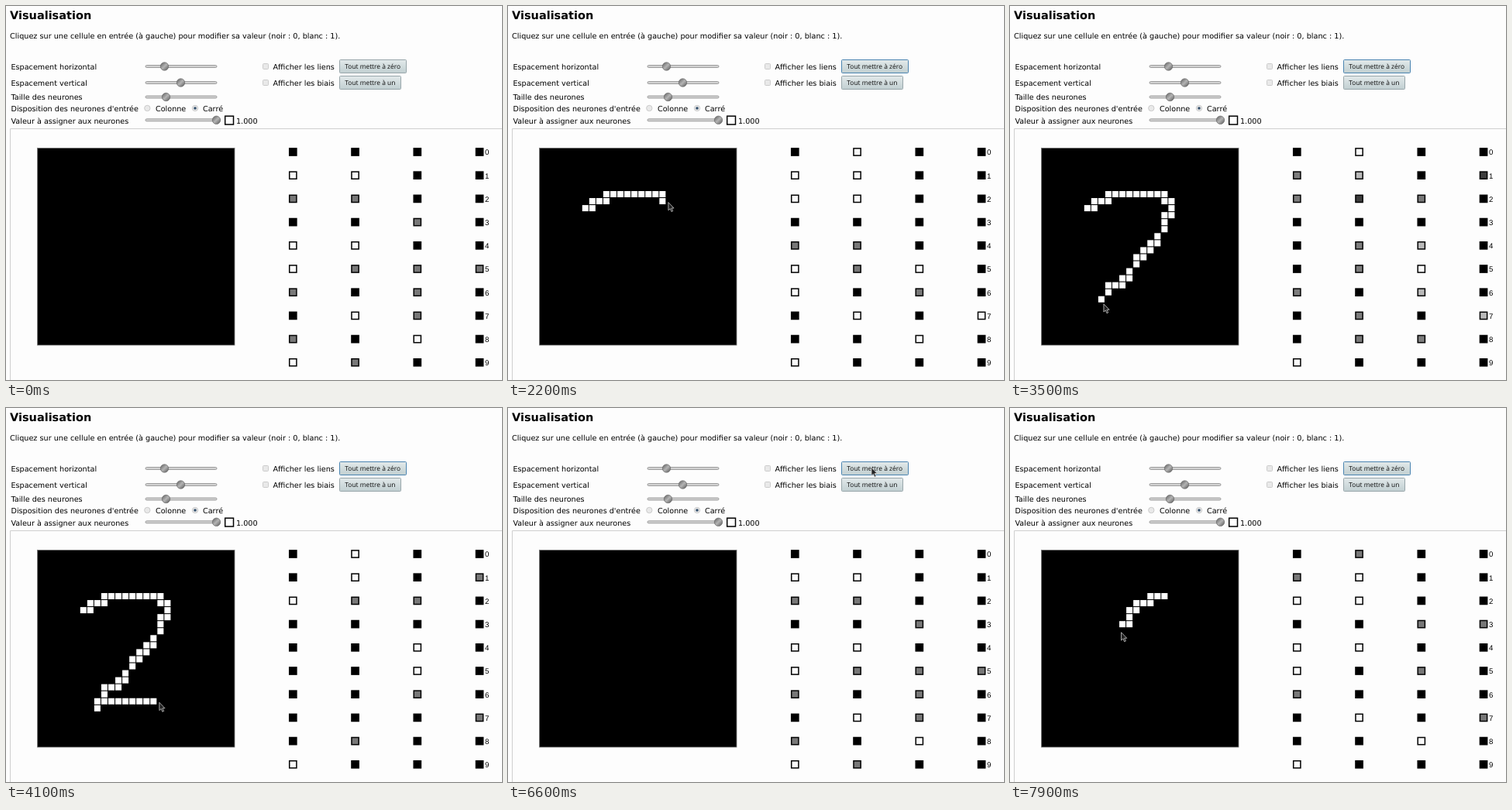
These frames come from a looping animation (640 by 483 pixels, 8000 ms). An HTML page:

```html
<!DOCTYPE html>
<html lang="fr">
<head>
<meta charset="utf-8">
<title>Visualisation</title>
<style>
  html, body { margin: 0; width: 100%; height: 100%; overflow: hidden; background: #fdfdfd; }
  svg { display: block; width: 640px; height: 483px; }
  text { font: 9.65px "DejaVu Sans", sans-serif; fill: #000; text-rendering: geometricPrecision; }
  .title { font-size: 14.5px; font-weight: bold; }
  .intro { font-size: 9.69px; }
  .btn text { font: 8.4px "Open Sans", sans-serif; fill: #0c0c0c; }
  .btn rect { fill: url(#face); stroke: #98a6aa; }
  .btn.focus rect { stroke: #4a84b0; }
  .digit { font: 9.65px "Liberation Sans", Arial, sans-serif; }
  .neuron { stroke: #000; stroke-width: 1.5; }
  .cell { fill: #fff; }
  .track { fill: #d2d2d2; stroke: #8c8c8c; stroke-width: .8; }
  .thumb { fill: url(#knob); stroke: #666; stroke-width: .7; }
  .check { fill: #e9e9e9; stroke: #c2c2c2; stroke-width: .8; }
</style>
</head>
<body>
<svg viewBox="0 0 640 483">
  <defs>
    <linearGradient id="face" x2="0" y2="1">
      <stop offset="0" stop-color="#e2e9ea"/><stop offset="1" stop-color="#c1cfd1"/>
    </linearGradient>
    <linearGradient id="knob" x2="1" y2="1">
      <stop offset="0" stop-color="#5c5c5c"/><stop offset=".5" stop-color="#b4b4b4"/><stop offset="1" stop-color="#555"/>
    </linearGradient>
  </defs>

  <text class="title" x="5" y="17">Visualisation</text>
  <text class="intro" x="5" y="41.5">Cliquez sur une cellule en entrée (à gauche) pour modifier sa valeur (noir : 0, blanc : 1).</text>
  <text x="6.5" y="81.5">Espacement horizontal</text>
  <text x="6.5" y="102.5">Espacement vertical</text>
  <text x="6.5" y="121">Taille des neurones</text>
  <text x="6.5" y="135.5">Disposition des neurones d'entrée</text>
  <text x="6.5" y="152">Valeur à assigner aux neurones</text>
  <text x="193" y="135.5">Colonne</text>
  <text x="254" y="135.5">Carré</text>
  <text x="297" y="152">1.000</text>
  <text x="344.5" y="81.5">Afficher les liens</text>
  <text x="344.5" y="102.5">Afficher les biais</text>

  <g id="sliders"></g>
  <circle class="check" cx="182.3" cy="132" r="3.7"/>
  <circle class="check" cx="244" cy="132" r="3.7"/>
  <circle cx="244" cy="132" r="1.8" fill="#34506c"/>
  <rect class="check" x="331.5" y="74.5" width="7" height="7" rx="1"/>
  <rect class="check" x="331.5" y="95.5" width="7" height="7" rx="1"/>
  <rect x="282.7" y="142.2" width="10.8" height="10.8" fill="#fff" stroke="#000" stroke-width="1.5"/>

  <g class="btn" id="reset">
    <rect x="430.5" y="69.5" width="86" height="17" rx="1"/>
    <text x="437.3" y="81">Tout mettre à zéro</text>
  </g>
  <g class="btn">
    <rect x="430.5" y="90.5" width="79" height="17" rx="1"/>
    <text x="437.3" y="102.3">Tout mettre à un</text>
  </g>

  <path d="M640 158.5H5.5V483" fill="none" stroke="#d0d0d0"/>
  <rect x="40.5" y="183.5" width="254.5" height="254.5" stroke="#777" stroke-width=".8"/>
  <g id="cells"></g>
  <g id="net"></g>
  <path id="cursor" d="M0 0V10.3L2.4 8.2 4 12 5.8 11.2 4.1 7.5H7.2Z" fill="#222" stroke="#ccc" stroke-width=".8"/>
</svg>
<script>
const LOOP = 8000, STEP = 100, FOCUS = 1100, RESET = 6500, PITCH = 9.05;
const $ = id => document.getElementById(id);
const linear = p => p;
const smooth = p => p * p * (3 - 2 * p);

function add(parent, tag, attrs) {
  const el = document.createElementNS('http://www.w3.org/2000/svg', tag);
  for (const k in attrs) el.setAttribute(k, attrs[k]);
  return parent.appendChild(el);
}

// Interpolates keys of the form [time, ...values].
function at(keys, t, ease = linear) {
  const i = keys.findIndex(k => k[0] > t);
  if (i <= 0) return keys.at(i).slice(1);
  const a = keys[i - 1], b = keys[i], p = ease((t - a[0]) / (b[0] - a[0]));
  return a.slice(1).map((v, j) => v + (b[j + 1] - v) * p);
}

for (const [x, y] of [[204.5, 78], [225.5, 99], [206.5, 117.5], [271.5, 147.3]]) {
  add($('sliders'), 'rect', { class: 'track', x: 180, y: y - 1.5, width: 92, height: 3, rx: 1.5 });
  add($('sliders'), 'circle', { class: 'thumb', cx: x, cy: y, r: 5.2 });
}

// Joins grid points by a staircase; a single diagonal step cuts the corner.
function trace(points) {
  const path = [points[0]];
  points.slice(1).forEach(([x1, y1], i) => {
    const [x0, y0] = points[i], dx = Math.abs(x1 - x0), dy = Math.abs(y1 - y0);
    if (dx === 1 && dy === 1) return path.push([x1, y1]);
    for (let a = 0, b = 0; a < dx || b < dy;) {
      if (a === dx || (b < dy && b * dx <= a * dy)) b++; else a++;
      path.push([x0 + a * Math.sign(x1 - x0), y0 + b * Math.sign(y1 - y0)]);
    }
  });
  return path;
}

function makeStroke(points, count) {
  const path = trace(points);
  const cells = path.map(([col, row]) => add($('cells'), 'rect', {
    class: 'cell', x: 41.5 + PITCH * col, y: 184.7 + PITCH * row, width: 8, height: 8
  }));
  // Pointer position ahead of the n-th painted cell.
  const tip = n => {
    const [col, row] = at(path.map((p, i) => [i, ...p]), n);
    return [44 + PITCH * col, 190.2 + PITCH * row];
  };
  return { cells, count, tip, begin: count[0][0], end: count.at(-1)[0] };
}

const two = makeStroke(
  [[6, 8], [7, 8], [9, 7], [17, 6], [18, 9], [17, 9], [17, 11], [16, 12], [13, 16], [12, 17],
   [11, 19], [9, 19], [9, 20], [8, 21], [8, 22], [9, 21], [19, 21]],
  [[1650, 0], [2200, 15], [2900, 29], [4100, 46], [4500, 49]]);
const arc = makeStroke(
  [[17, 6], [15, 6], [13, 7], [11, 11]],
  [[7350, 0], [7900, 11]]);
const strokes = [two, arc];

const moves = [
  [200, 268, 272], [800, 470, 77], [1000, 470, 77], [two.begin, ...two.tip(0)],
  [two.end, ...two.tip(49)], [5600, 469, 70], [6100, 469, 77], [6600, 469, 77],
  [arc.begin, ...arc.tip(0)]
];

// Each pose names the white and the grey rows of the four layers.
function pose(white, grey) {
  const w = white.split('|'), g = grey.split('|');
  return Array.from({ length: 40 }, (_, i) => {
    const layer = Math.floor(i / 10), row = i % 10;
    return w[layer].includes(row) ? 250 : g[layer].includes(row) ? 120 : 0;
  });
}
const idle = pose('1459|147|8|', '268|259|3567|5');
const done = pose('249|12|5|2', '|4|349|');
const activity = [
  [two.begin, ...idle],
  [2200, ...pose('12569|0127|58|7', '4|45|6|')],
  [2900, ...pose('169|0457|568|7', '|18|24|')],
  [4100, ...pose('29|01|45|', '|28|26|17')],
  [two.end, ...done], [RESET - 1, ...done],
  [RESET, ...idle], [arc.begin, ...idle],
  [arc.end, ...pose('2459|1247|8|', '16|0|35|37')]
];

const neurons = idle.map((_, i) => add($('net'), 'rect', {
  class: 'neuron', x: 365.7 + 80.25 * Math.floor(i / 10), y: 183.9 + 30.2 * (i % 10), width: 9.2, height: 9.2
}));
for (let i = 0; i < 10; i++)
  add($('net'), 'text', { class: 'digit', x: 618, y: 192.3 + 30.2 * i }).textContent = i;

function draw(t) {
  let tip = at(moves, t, smooth);
  for (const s of strokes) {
    const n = at(s.count, t)[0], erased = s === two && t >= RESET;
    s.cells.forEach((c, i) =>
      c.setAttribute('visibility', !erased && i + 1 <= n + 1e-6 ? 'visible' : 'hidden'));
    if (t >= s.begin && t <= s.end) tip = s.tip(n);
  }
  at(activity, t).forEach((v, i) => neurons[i].setAttribute('fill', `rgb(${v},${v},${v})`));
  $('cursor').setAttribute('transform', `translate(${tip})`);
  $('cursor').setAttribute('visibility', t < moves[0][0] ? 'hidden' : 'visible');
  $('reset').classList.toggle('focus', t >= FOCUS);
}

const start = performance.now();
function tick() {
  const t = (performance.now() - start) % LOOP;
  draw(Math.floor(t / STEP) * STEP);
  requestAnimationFrame(tick);
}
tick();
</script>
</body>
</html>
```
